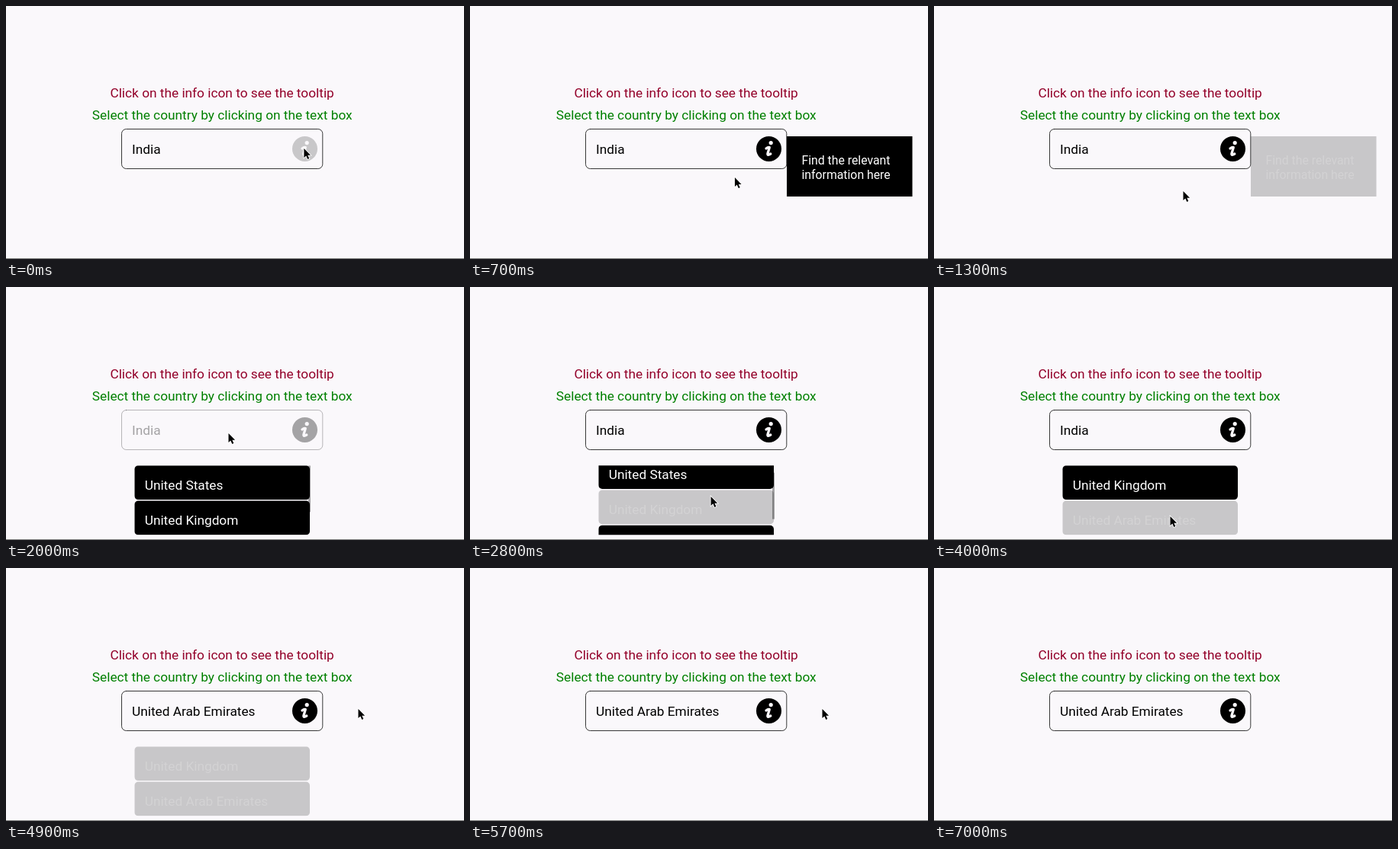
These frames come from a looping animation (600 by 332 pixels, 7100 ms). An HTML page with a canvas:

```html
<!DOCTYPE html>
<html lang="en">
<head>
<meta charset="utf-8">
<title>Country picker with tooltip</title>
<style>
  html, body { margin: 0; width: 100%; height: 100%; overflow: hidden; background: #faf8fb; }
  canvas { display: block; }
</style>
</head>
<body>
<canvas id="stage" width="600" height="332"></canvas>
<script>
const ctx = document.getElementById('stage').getContext('2d');
const LOOP = 7100, STEP = 100, TRAVEL = 500;
const BACKGROUND = '#faf8fb';
const LIST = { x: 168.3, y: 234.3, width: 229.7, height: 91, pitch: 46.3 };
const COUNTRIES = ['United States', 'United Kingdom', 'United Arab Emirates'];

// Where the pointer rests and when it sets off for the next place
const STOPS = [
  { x: 390.4, y: 187, leave: 400 },
  { x: 326.5, y: 243, leave: 1400 },
  { x: 291.5, y: 192, leave: 2100 },
  { x: 315.6, y: 297, leave: 2600 },
  { x: 315.6, y: 228, leave: 3300 },
  { x: 309.5, y: 301, leave: 4150 },
  { x: 461.5, y: 185 }
];

const clamp = (v, lo, hi) => Math.min(hi, Math.max(lo, v));
const ease = p => p < .5 ? 2 * p * p : 1 - 2 * (1 - p) ** 2;
const ramp = (t, start, duration) => ease(clamp((t - start) / duration, 0, 1));

// Rises to 1 after start, falls back to 0 after end
const hold = (t, start, end) => ramp(t, start, 150) - ramp(t, end, 250);
// Touch feedback: opacity dips to 0.2 while pressed
const press = (t, down, up = Infinity) => 1 - .8 * hold(t, down, up);

function pointer(t) {
  const at = { ...STOPS[0] };
  STOPS.slice(1).forEach((stop, i) => {
    const p = ramp(t, STOPS[i].leave, TRAVEL);
    at.x += (stop.x - STOPS[i].x) * p;
    at.y += (stop.y - STOPS[i].y) * p;
  });
  return at;
}

function text(str, x, y, color, size = 17.25, align = 'left') {
  ctx.font = `${size}px Roboto, sans-serif`;
  ctx.textAlign = align;
  ctx.fillStyle = color;
  ctx.fillText(str, x, y);
}

function roundRect(x, y, w, h, r) {
  ctx.beginPath();
  ctx.roundRect(x, y, w, h, r);
}

function disc(x, y, r, color) {
  ctx.fillStyle = color;
  ctx.beginPath();
  ctx.arc(x, y, r, 0, 2 * Math.PI);
  ctx.fill();
}

function drawField(t) {
  const alpha = press(t, 1700, 1925);
  ctx.globalAlpha = alpha;
  roundRect(151.5, 161.5, 263.3, 52, 6);
  ctx.lineWidth = .9;
  ctx.strokeStyle = '#222';
  ctx.stroke();
  text(t < 4100 ? 'India' : COUNTRIES[2], 165, 194, '#000');

  ctx.globalAlpha = alpha * press(t, -150, 100);
  disc(391.5, 187.4, 16.5, '#000');

  // The letter is a cut-out, so it keeps the background colour at any opacity
  ctx.globalAlpha = 1;
  disc(394.2, 179.6, 2.6, BACKGROUND);
  ctx.strokeStyle = BACKGROUND;
  ctx.lineWidth = 3.3;
  ctx.lineJoin = ctx.lineCap = 'round';
  ctx.stroke(new Path2D('M388 187Q390.4 185 392.3 185.6L389.9 193.8Q389.6 196.6 393.8 194'));
}

function drawTooltip(t) {
  if (t < 100 || t >= 1400) return;
  ctx.globalAlpha = press(t, 1100);
  ctx.fillStyle = '#000';
  ctx.fillRect(415, 171, 164.5, 79);
  text('Find the relevant', 434.5, 207.7, '#fff', 15.8);
  text('information here', 434.5, 227, '#fff', 15.8);
}

function drawList(t) {
  if (t < 2000 || t >= 5000) return;
  const { x, y, width, height, pitch } = LIST;
  const dragged = STOPS[3].y - pointer(clamp(t, 2600, 3100)).y;
  const scroll = clamp(dragged - 8, 0, pitch);
  const rowAlpha = [1, press(t, 2500, 2980), press(t, 3800, 4050)];

  ctx.save();
  ctx.beginPath();
  ctx.rect(x, y, width + 1, height);
  ctx.clip();
  COUNTRIES.forEach((name, i) => {
    const top = y + i * pitch - scroll;
    ctx.globalAlpha = press(t, 4700) * rowAlpha[i];
    ctx.fillStyle = '#000';
    roundRect(x, top, width, pitch - 1.5, 5);
    ctx.fill();
    text(name, 181.7, top + 31.4, '#fff');
  });

  ctx.globalAlpha = .35 * (hold(t, 1800, 2200) + hold(t, 2600, 3100));
  ctx.fillStyle = '#000';
  ctx.fillRect(x + width - 2, y + scroll * .66, 3, 61);

  const overscroll = hold(t, 2900, 3150);
  ctx.globalAlpha = .2 * overscroll;
  ctx.fillStyle = '#fff';
  ctx.beginPath();
  ctx.ellipse(STOPS[4].x, 358 - 12.4 * overscroll, 200, 33, 0, 0, 2 * Math.PI);
  ctx.fill();
  ctx.restore();
}

function drawPointer(t) {
  if (t >= 6000) return;
  const { x, y } = pointer(t);
  const arrow = new Path2D('M0 0V12L2.8 9.4 4.8 14 6.8 13.1 4.8 8.8H8.6Z');
  ctx.save();
  ctx.globalAlpha = 1;
  ctx.translate(x, y);
  ctx.lineJoin = 'miter';
  ctx.lineWidth = 1.6;
  ctx.strokeStyle = '#fff';
  ctx.stroke(arrow);
  ctx.fillStyle = '#000';
  ctx.fill(arrow);
  ctx.restore();
}

function draw(now) {
  const t = Math.floor(now % LOOP / STEP) * STEP;
  ctx.globalAlpha = 1;
  ctx.fillStyle = BACKGROUND;
  ctx.fillRect(0, 0, 600, 332);
  ctx.fillStyle = '#777';
  ctx.fillRect(0, 331, 600, 1);
  text('Click on the info icon to see the tooltip', 283.1, 119.6, '#930029', 17.27, 'center');
  text('Select the country by clicking on the text box', 283.2, 149.3, '#008000', 17.27, 'center');
  drawField(t);
  drawTooltip(t);
  drawList(t);
  drawPointer(t);
  requestAnimationFrame(draw);
}
requestAnimationFrame(draw);
</script>
</body>
</html>
```
